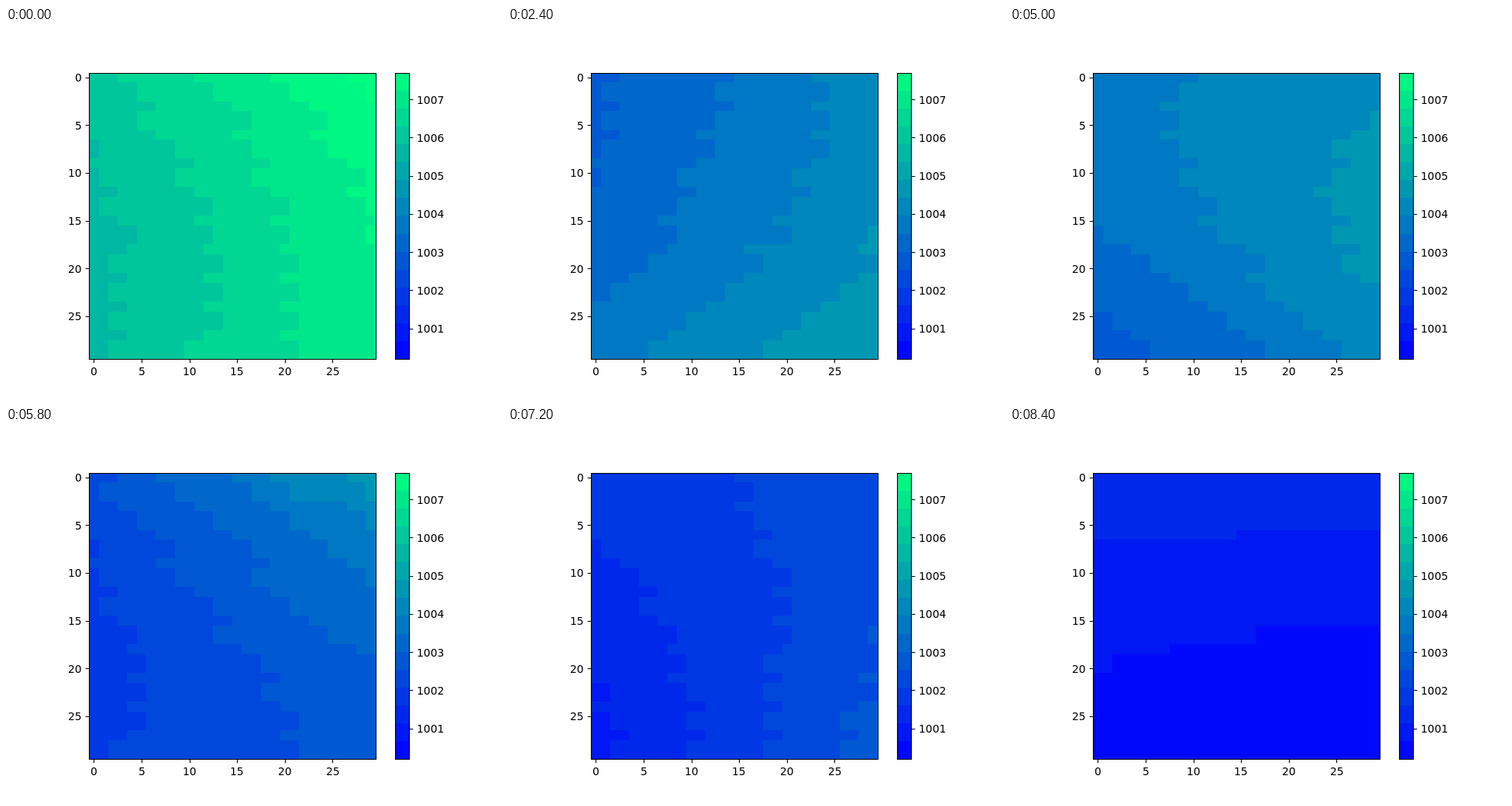
Animation of 640 by 480 pixels, one loop 8.6 s. Source, as an HTML page with a canvas:

```html
<!DOCTYPE html>
<html lang="en">
<head>
<meta charset="utf-8">
<title>Pressure map</title>
<style>
  html, body { margin: 0; width: 100%; height: 100%; overflow: hidden; background: #fff; }
  canvas, svg { position: absolute; left: 0; top: 0; width: 640px; height: 480px; }
  text { font: 13.89px "DejaVu Sans", sans-serif; fill: #000; }
  path { fill: none; stroke: #000; stroke-width: 1.11; }
</style>
</head>
<body>
<canvas id="map" width="640" height="480"></canvas>
<svg id="axes" viewBox="0 0 640 480"></svg>
<script>
const LOOP = 8600, STEP = 200, N = 30, LEVELS = 16;
const LEFT = 107.2, TOP = 57.6, SIZE = 369.6, CELL = SIZE / N;
const BAR_X = 502, BAR_W = 18, DIGIT = 8.84;

// The pressure surface at key times: level in the middle, slopes, twist and north-south sag.
const poses = [
  { t: 0,    mid: 13.37, east: 1.68,  south: -0.51, twist: -0.13, sag: 0.52 },
  { t: 1200, mid: 10.86, east: 1.82,  south: 0.68,  twist: 0.04,  sag: 0.67 },
  { t: 2400, mid: 7.54,  east: 1.3,   south: 0.78,  twist: -0.06, sag: 0.4 },
  { t: 5000, mid: 8.2,   east: 1.15,  south: -0.73, twist: 0.54,  sag: -0.75 },
  { t: 5800, mid: 5.17,  east: 1.49,  south: -1.22, twist: -0.8,  sag: 0.7 },
  { t: 7200, mid: 3.62,  east: 1.23,  south: -0.24, twist: 0.7,   sag: 0.16 },
  { t: 8400, mid: 1.16,  east: -0.12, south: -1.06, twist: -0.05, sag: 0.64 }
];

const ctx = document.getElementById("map").getContext("2d");
const clamp = (v, lo, hi) => Math.min(hi, Math.max(lo, v));
const snap = v => Math.floor(v + 0.5) + 0.5;

function shade(level) {
  const k = clamp((level + 0.5) / LEVELS, 0, 1);
  return `rgb(0,${Math.round(255 * k)},${Math.round(255 - 127.5 * k)})`;
}

function poseAt(t) {
  const n = Math.max(1, poses.findIndex(p => p.t >= t));
  const a = poses[n - 1], b = poses[n], k = (t - a.t) / (b.t - a.t);
  const pose = {};
  for (const key in a) pose[key] = a[key] + (b[key] - a[key]) * k;
  return pose;
}

function surface(p, x, y) {
  const u = x / 15 - 1, v = y / 14.5 - 1;
  return p.mid + p.east * u + p.south * v + p.twist * u * v + p.sag * v * v;
}

// Cells share the value of staggered blocks, 4 wide and 1 or 2 high.
function blockCentre(c, r) {
  const pair = r % 3 > 0;
  const off = (pair ? 1 : 3) + (r >= 18 ? 1 : 0);
  return [
    Math.floor((c - off) / 4) * 4 + off + 2,
    pair ? r - r % 3 + 1.5 : r
  ];
}

function drawMap(t) {
  const pose = poseAt(t);
  const edge = (start, i) => Math.round(start + i * CELL);
  for (let r = 0; r < N; r++) {
    const y0 = edge(TOP, r), y1 = edge(TOP, r + 1);
    for (let c = 0; c < N; c++) {
      const x0 = edge(LEFT, c), x1 = edge(LEFT, c + 1);
      const level = Math.floor(surface(pose, ...blockCentre(c, r)));
      ctx.fillStyle = shade(Math.max(0, level));
      ctx.fillRect(x0, y0, x1 - x0, y1 - y0);
    }
  }
}

function drawBar() {
  const edge = i => Math.round(TOP + SIZE * (1 - i / LEVELS));
  for (let i = 0; i < LEVELS; i++) {
    ctx.fillStyle = shade(i);
    ctx.fillRect(BAR_X, edge(i + 1), BAR_W, edge(i) - edge(i + 1));
  }
}

function drawAxes() {
  const bottom = 427.5;
  let d = `M107.5 58.5H477.5V${bottom}H107.5Z M502.5 58.5H520.5V${bottom}H502.5Z`;
  let labels = "";
  // align: 0 left, 0.5 centred, 1 right; text starts on whole pixels
  const label = (x, y, align, n) => {
    const start = Math.round(x - align * DIGIT * String(n).length);
    labels += `<text x="${start}" y="${Math.round(y)}">${n}</text>`;
  };
  for (let i = 0; i < N; i += 5) {
    const x = LEFT + (i + 0.5) * CELL, y = TOP + (i + 0.5) * CELL;
    d += `M${snap(x)} ${bottom}v4.86 M107.5 ${snap(y)}h-4.86`;
    label(x, 448, 0.5, i);
    label(97.5, y + 5.5, 1, i);
  }
  for (let p = 1001; p <= 1007; p++) {
    const y = 387.6 - (p - 1001) * 49.23;
    d += `M520.5 ${snap(y)}h4.86`;
    label(529.8, y + 5.5, 0, p);
  }
  document.getElementById("axes").innerHTML = `<path d="${d}"/>${labels}`;
}

let shown = -1;
function tick(now) {
  let step = Math.floor((now % LOOP) / STEP);
  if (step === 3 || step === 20 || step === 22) step--; // brief holds
  if (step !== shown) drawMap(step * STEP);
  shown = step;
  requestAnimationFrame(tick);
}

drawBar();
drawAxes();
tick(performance.now());
</script>
</body>
</html>
```
